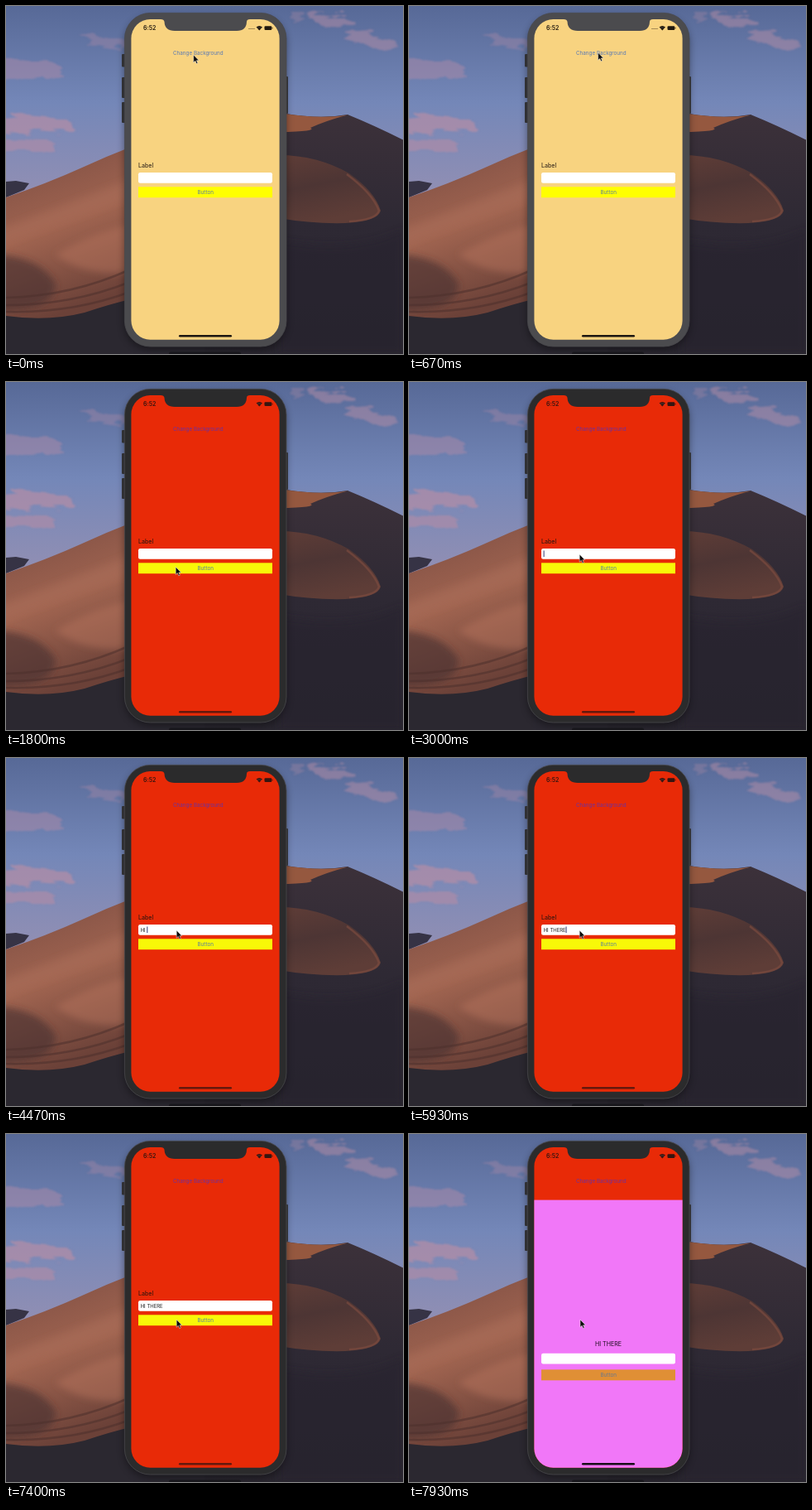
Recreate the animation shown at these times as an HTML page. Size 480 by 420 pixels, loop 8000 ms.

```html
<!DOCTYPE html>
<html lang="en">
<head>
<meta charset="utf-8">
<title>Phone screens</title>
<style>
  html, body { margin: 0; width: 100%; height: 100%; overflow: hidden; background: #2b2831; }
  svg { display: block; width: 480px; height: 420px; font-family: Inter, "Open Sans", sans-serif; }
</style>
</head>
<body>
<svg viewBox="0 0 480 420" xmlns="http://www.w3.org/2000/svg">
  <defs>
    <linearGradient id="sky" x1="0" y1="0" x2="0" y2="1">
      <stop offset="0" stop-color="#576997"/>
      <stop offset=".45" stop-color="#7487b8"/>
      <stop offset="1" stop-color="#9a91b2"/>
    </linearGradient>
    <linearGradient id="dune" x1="0" y1="0" x2=".25" y2="1">
      <stop offset="0" stop-color="#7c4f44"/>
      <stop offset=".25" stop-color="#8a5648"/>
      <stop offset=".55" stop-color="#a06450"/>
      <stop offset="1" stop-color="#6b4138"/>
    </linearGradient>
    <linearGradient id="shade" x1="0" y1="0" x2="0" y2="1">
      <stop offset="0" stop-color="#3c313a"/>
      <stop offset=".45" stop-color="#2e2934"/>
      <stop offset="1" stop-color="#29262f"/>
    </linearGradient>
    <linearGradient id="ridge" x1="0" y1="0" x2=".3" y2="1">
      <stop offset="0" stop-color="#5f3d37"/>
      <stop offset=".5" stop-color="#4d3534"/>
      <stop offset="1" stop-color="#5e3d37"/>
    </linearGradient>
    <filter id="soft" x="-20%" y="-40%" width="140%" height="180%"><feGaussianBlur stdDeviation="4"/></filter>
    <filter id="blur" x="-20%" y="-20%" width="140%" height="140%"><feGaussianBlur stdDeviation="5"/></filter>
    <filter id="wisps" x="-5%" y="-10%" width="110%" height="120%">
      <feTurbulence type="fractalNoise" baseFrequency=".025 .09" numOctaves="3" seed="4"/>
      <feDisplacementMap in="SourceGraphic" scale="26" xChannelSelector="R" yChannelSelector="G"/>
      <feGaussianBlur stdDeviation="1.2"/>
    </filter>
    <clipPath id="glass"><rect x="151.4" y="16" width="179.2" height="386.7" rx="23"/></clipPath>
    <clipPath id="sand"><path d="M0 231Q50 214 92 195Q120 182 150 170.500V354Q125 360 95 370Q52 381 0 374Z"/></clipPath>
  </defs>

  <g id="desert">
    <rect width="480" height="260" fill="url(#sky)"/>
    <g filter="url(#wisps)" fill="#b58da6">
      <path d="M-10 66Q25 58 62 76Q80 84 66 88Q30 82 -10 92Z" opacity=".45"/>
      <path d="M-10 136Q30 126 52 138Q90 142 82 150Q40 150 -10 154Z" opacity=".7"/>
      <path d="M-10 160Q30 160 66 166Q60 178 25 176L-10 172Z" opacity=".6"/>
      <path d="M92 40Q118 34 148 46L140 52Q112 50 92 40Z" opacity=".35"/>
      <path d="M366 12Q390 4 422 20Q415 30 390 25Z" opacity=".5"/>
      <path d="M410 36Q440 26 470 42Q450 52 425 48Z" opacity=".5"/>
      <path d="M340 8Q352 4 364 14L352 20Z" opacity=".3"/>
    </g>
    <path d="M0 212L12 211L28 214L22 222L0 231Z" fill="#363345"/>
    <path d="M0 350H150V420H0Z" fill="#2b2830"/>
    <g clip-path="url(#sand)">
      <rect y="160" width="150" height="222" fill="url(#dune)"/>
      <g filter="url(#soft)">
        <path d="M-10 270Q70 240 160 205V228Q80 258 -10 290Z" fill="#b57760" opacity=".3"/>
        <path d="M60 300Q110 270 160 262V320Q100 330 60 300Z" fill="#ba775e" opacity=".45"/>
        <path d="M-20 300Q40 300 60 335Q60 370 -20 368Z" fill="#49302e" opacity=".65"/>
      </g>
      <g fill="none" stroke="#4d302d" stroke-opacity=".55" stroke-width="2.5">
        <path d="M0 352Q80 350 150 318"/>
        <path d="M0 361Q80 361 150 333"/>
        <path d="M0 369Q80 371 150 345"/>
      </g>
    </g>
    <path d="M240 140L339 130Q380 137 413 131Q445 144 480 161.500V420H240Z" fill="url(#shade)"/>
    <path d="M330 129Q380 137 413 131.500Q388 138 368 147Q378 151 330 152.500Z" fill="#95583f"/>
    <path d="M330 180Q376 180 415 202Q446 224 453 247Q450 260 410 262Q370 263 330 256Z" fill="url(#ridge)"/>
    <path d="M412 203Q443 226 451 247Q448 258 415 260" fill="none" stroke="#7b4b3f" stroke-width="2.500" opacity=".7"/>
    <path d="M330 283Q420 300 480 270V420H330Z" fill="#26242d" opacity=".5" filter="url(#soft)"/>
  </g>

  <rect x="143" y="13" width="196" height="402" rx="32" fill="#000" opacity=".4" filter="url(#blur)"/>
  <rect x="197" y="417.5" width="87" height="5" rx="2" fill="#17161b"/>

  <g fill="#303033">
    <rect x="140" y="58" width="5" height="15.5" rx="1"/>
    <rect x="140" y="86" width="5" height="25" rx="1"/>
    <rect x="140" y="116" width="5" height="25" rx="1"/>
    <rect x="337" y="85" width="4" height="45" rx="1"/>
  </g>
  <rect id="body" x="143.4" y="8.4" width="195.6" height="402.6" rx="31" stroke="#4a4a4d" stroke-width=".8"/>

  <g clip-path="url(#glass)">
    <rect id="back" x="150" y="15" width="182" height="390"/>
    <text id="change" x="202" y="59" font-size="6.3">Change Background</text>
    <text x="160" y="194.6" font-size="7.1" fill="#1c1310">Label</text>
    <rect x="160" y="201" width="162" height="12.8" rx="2.2" fill="#fff"/>
    <text id="typed" x="162.7" y="209.7" font-size="5.96" fill="#222" xml:space="preserve"></text>
    <rect id="caret" y="203.5" width="1" height="7.6" fill="#333c78"/>
    <rect id="button" x="160" y="218.3" width="162" height="12.9"/>
    <text x="241.2" y="227.3" font-size="6.3" text-anchor="middle" fill="#587f9c">Button</text>

    <g id="sheet">
      <rect x="150" y="16" width="182" height="390" fill="#f177f8"/>
      <text x="241" y="192.2" font-size="7.1" text-anchor="middle" fill="#1f1020">HI THERE</text>
      <rect x="160" y="201.2" width="162" height="12.6" rx="2.2" fill="#fff"/>
      <rect x="160" y="220.7" width="162" height="13" fill="#e08f35"/>
      <text x="241.2" y="229.7" font-size="6.3" text-anchor="middle" fill="#66788f">Button</text>
    </g>

    <rect id="home" x="209" y="397" width="64" height="2.4" rx="1.2"/>
  </g>
  <path id="notch" d="M187 15H295V16Q291 16 291 19Q290.500 30 279 30H204Q192 30 191.500 19Q191 16 187 16Z"/>

  <g id="status">
    <text x="166" y="29" font-size="7" font-weight="600">6:52</text>
    <path d="M302.600 25.600Q306.300 22.300 310 25.600L306.300 29.500Z"/>
    <path d="M303.300 26.900Q306.300 24.700 309.300 26.900" fill="none" stroke="#fff" stroke-opacity=".25" stroke-width=".5"/>
    <rect x="312.500" y="24.300" width="8.800" height="4.600" rx="1.200"/>
    <rect x="321.700" y="25.700" width=".7" height="1.800"/>
    <g id="dots">
      <circle cx="294" cy="27.600" r=".5"/><circle cx="296" cy="27.600" r=".5"/>
      <circle cx="298" cy="27.600" r=".5"/><circle cx="300" cy="27.600" r=".5"/>
    </g>
  </g>

  <path id="pointer" d="M0 0V9.200L2.100 7.300L3.600 10.600L5.100 9.900L3.700 6.700H6.500Z"
        fill="#0b0b0b" stroke="#fff" stroke-opacity=".8" stroke-width=".6" stroke-linejoin="round"/>
</svg>
<script>
const LOOP = 8000, FPS = 15;
const RED_AT = 800, FOCUS_AT = 2870, SHEET_AT = 7755;
const MESSAGE = "HI THERE";
const KEY_TIMES = [3800, 4000, 4300, 4670, 4870, 5070, 5330, 5530];
// time, x, y of the pointer tip
const PATH = [
  [0, 226.7, 59], [400, 228.6, 56.2], [930, 228.6, 56.2], [1600, 205.2, 223.2],
  [2000, 205.2, 223.2], [2530, 206.2, 208], [6200, 206.2, 208],
  [6930, 206.2, 224], [7500, 206.2, 224], [7930, 207, 224]
];
const CREAM = { back: "#f8d380", body: "#4b4b4e", button: "#ffff00", change: "#5879b4", ink: "#20180e", home: "#1c1510" };
const RED = { back: "#e82a07", body: "#2b2b2c", button: "#f8f808", change: "#6c30a0", ink: "#351510", home: "#64190d" };

const $ = id => document.getElementById(id);
const set = (id, name, value) => $(id).setAttribute(name, value);
const smooth = u => u * u * (3 - 2 * u);

function pointerAt(t) {
  const i = PATH.findIndex(p => p[0] > t);
  if (i < 0) return PATH[PATH.length - 1].slice(1);
  const [t0, x0, y0] = PATH[i - 1], [t1, x1, y1] = PATH[i];
  const u = smooth((t - t0) / (t1 - t0));
  return [x0 + (x1 - x0) * u, y0 + (y1 - y0) * u];
}

// Critically damped spring
function sheetOffset(t) {
  if (t < SHEET_AT) return 400;
  const k = 18.26 * (t - SHEET_AT) / 1000;
  return 388 * (1 + k) * Math.exp(-k);
}

function render(time) {
  const t = Math.floor(time * FPS / 1000 + 0.06) * 1000 / FPS;
  const look = t < RED_AT ? CREAM : RED;
  for (const id of ["back", "body", "button", "change"]) set(id, "fill", look[id]);
  set("notch", "fill", look.body);
  set("status", "fill", look.ink);
  set("dots", "visibility", look === CREAM ? "visible" : "hidden");
  set("home", "fill", t < SHEET_AT ? look.home : "#180d18");

  const count = KEY_TIMES.filter(k => k <= t).length;
  $("typed").textContent = MESSAGE.slice(0, count);
  const lastKey = count ? KEY_TIMES[count - 1] : FOCUS_AT;
  const lit = t >= FOCUS_AT && (t - lastKey) % 1000 < 500;
  set("caret", "visibility", lit ? "visible" : "hidden");
  set("caret", "x", 162.6 + (count ? $("typed").getComputedTextLength() : 0));

  set("sheet", "transform", `translate(0 ${sheetOffset(t)})`);
  set("pointer", "transform", `translate(${pointerAt(t).join(" ")})`);
}

function tick() {
  render(performance.now() % LOOP);
  requestAnimationFrame(tick);
}
tick();
</script>
</body>
</html>
```
